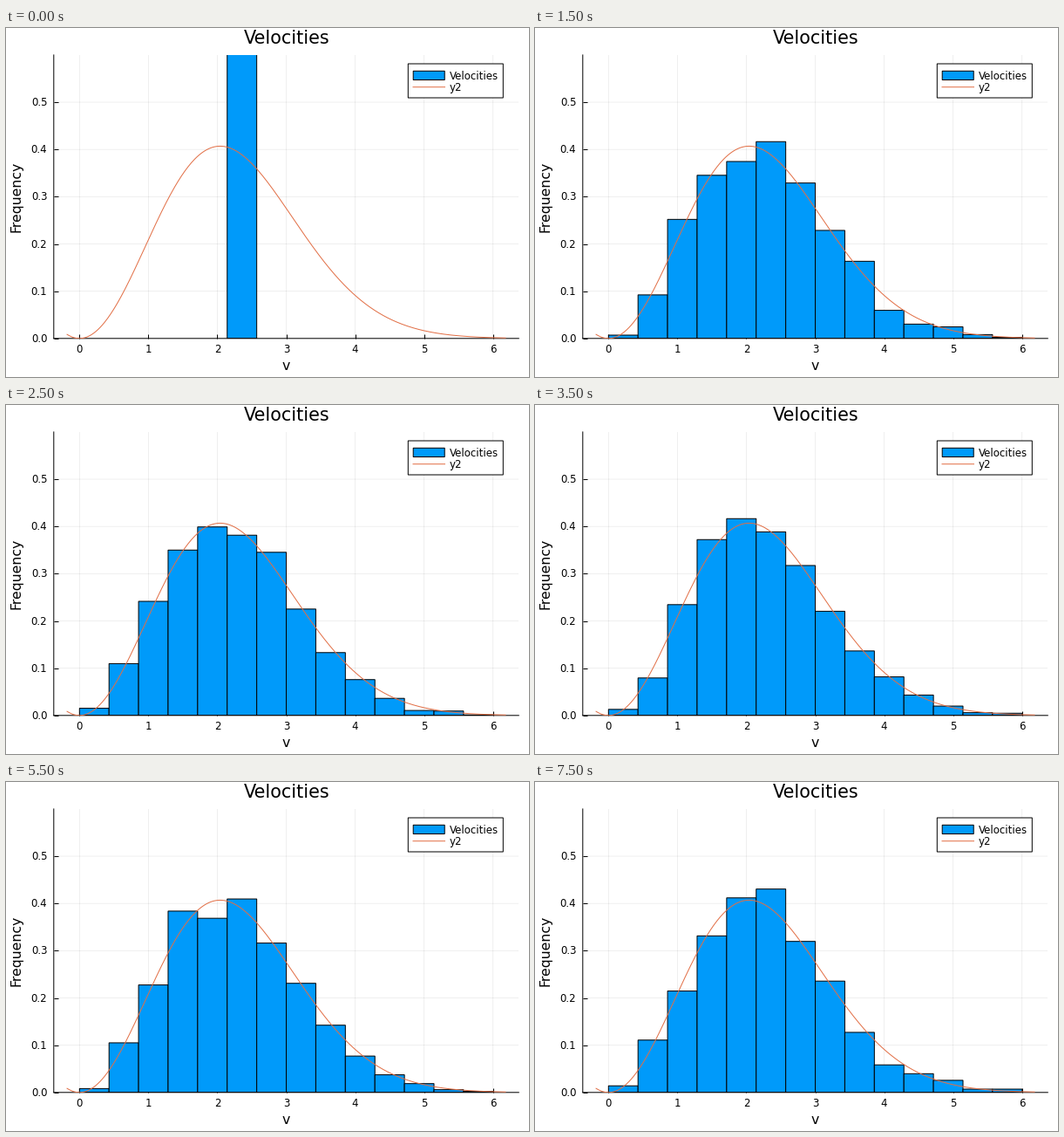
Animation, 600 px wide and 400 px high, one loop 8 s. Source, as a matplotlib script:

```python
import numpy as np
import matplotlib.pyplot as plt
from matplotlib.animation import FuncAnimation
from matplotlib.patches import Rectangle

W, H, DPI = 600, 400, 100
PX = 72 / DPI                       # points per pixel
BLUE, ORANGE = "#009AFA", "#E26F46"
FRAMES, STEP = 16, 500
PARTICLES, BINS, BIN_W = 2000, 14, 3 / 7
START_BIN = 5                       # every particle starts at one speed
DECAY = 0.26                        # share still unscattered after each step
SMALL, MEDIUM, LARGE = 11.75, 15.8, 20.8

plt.rcParams["path.snap"] = False
plt.rcParams["font.family"] = "DejaVu Sans"


def maxwell(v, a=1.4425):
    return np.sqrt(2 / np.pi) * v**2 / a**3 * np.exp(-v**2 / (2 * a**2))


left_edges = np.arange(BINS) * BIN_W
settled = maxwell(left_edges + BIN_W / 2)
settled /= settled.sum()


def histogram(step):
    """Bin heights while a single speed relaxes to the Maxwell curve."""
    fresh = DECAY**step
    share = (1 - fresh) * settled
    share[START_BIN] += fresh
    counts = np.random.default_rng(step).multinomial(PARTICLES, share)
    return counts / (PARTICLES * BIN_W)


fig = plt.figure(figsize=(W / DPI, H / DPI), dpi=DPI, facecolor="white")

# Plot area, placed in pixels
LEFT, RIGHT, TOP, BOTTOM = 54.8, 588.3, 30.9, 355.8
X0, X_UNIT = 84.3, 79.08
ax = fig.add_axes([LEFT / W, 1 - BOTTOM / H, (RIGHT - LEFT) / W, (BOTTOM - TOP) / H])
ax.set_xlim((LEFT - X0) / X_UNIT, (RIGHT - X0) / X_UNIT)
ax.set_ylim(0, 0.6)
ax.set_xticks(range(7))
ax.set_yticks(np.arange(6) / 10)
ax.tick_params(direction="in", length=5 * PX, width=PX,
               labelbottom=False, labelleft=False)
ax.grid(color="black", alpha=0.1, lw=0.6 * PX)
ax.set_axisbelow(True)
for side, spine in ax.spines.items():
    spine.set_linewidth(PX)
    spine.set_visible(side in ("left", "bottom"))

bars = ax.bar(left_edges, np.zeros(BINS), BIN_W, align="edge",
              color=BLUE, edgecolor="black", lw=PX, zorder=2)
v = np.linspace(-0.18, 6.18, 400)
ax.plot(v, maxwell(v), color=ORANGE, lw=PX, zorder=3)

# Labels and legend, in pixel coordinates
page = fig.add_axes([0, 0, 1, 1])
page.set_xlim(0, W)
page.set_ylim(H, 0)
page.axis("off")


def label(x, y, text, size=SMALL, ha="center", rotation=0):
    page.text(x, y, text, fontsize=size * PX, ha=ha, va="baseline",
              rotation=rotation, rotation_mode="anchor")


def box(x, y, w, h, color):
    page.add_patch(Rectangle((x, y), w, h, fc=color, ec="black", lw=PX))


label(321.8, 17.8, "Velocities", LARGE)
label(321.6, 391.5, "v", MEDIUM)
label(16.5, 193, "Frequency", MEDIUM, rotation=90)
for i in range(7):
    label(X0 + i * X_UNIT, 371.5, str(i))
for i in range(6):
    label(47.3, BOTTOM - i * (BOTTOM - TOP) / 6 + 4, f"{i / 10:.1f}", ha="right")

box(461.3, 41, 109, 39, "white")
box(467.2, 49.3, 36, 10.2, BLUE)
page.plot([467, 503.5], [67.7, 67.7], color=ORANGE, lw=PX)
label(508.5, 59.2, "Velocities", ha="left")
label(508.5, 72.2, "y2", ha="left")


def draw(step):
    for bar, height in zip(bars, histogram(step)):
        bar.set_height(height)
        bar.set_visible(height > 0)
    return list(bars)


anim = FuncAnimation(fig, draw, frames=FRAMES, interval=STEP,
                     repeat=True, repeat_delay=0, blit=False)
plt.show()
```
